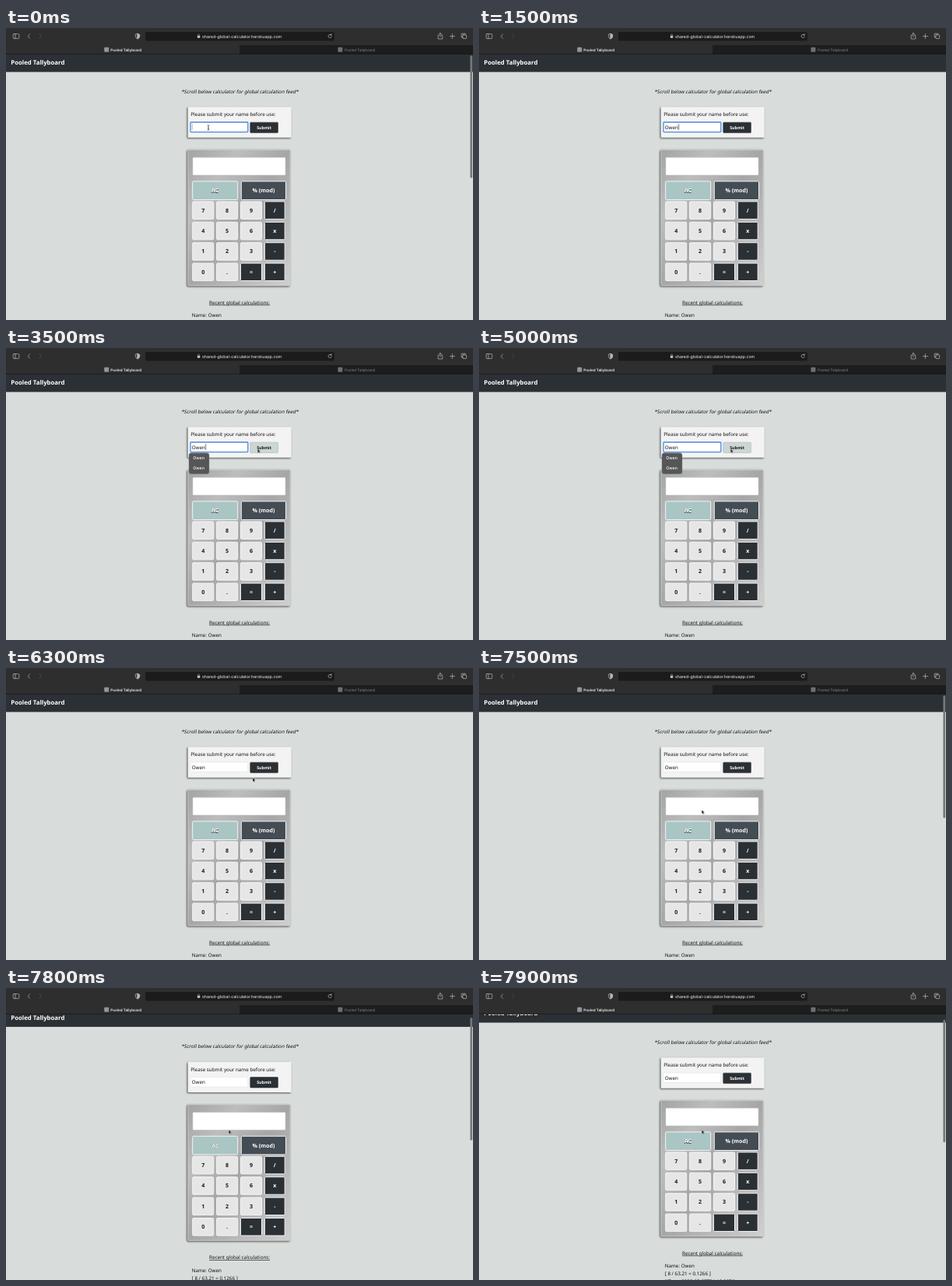
Recreate the animation shown at these times as an HTML page. Size 600x375 px, loop 8000 ms.

```html
<!DOCTYPE html>
<html lang="en">
<head>
<meta charset="utf-8">
<title>Pooled Tallyboard</title>
<style>
  html, body { margin: 0; width: 100%; height: 100%; overflow: hidden; background: #d8dddc; }
  svg { display: block; width: 100vw; height: 100vh; }
  text { font: 6.27px "Noto Sans", "Open Sans", sans-serif; fill: #111; text-rendering: geometricPrecision; }
  .mid { text-anchor: middle; }
  .bold { font-weight: 700; }
  .title { font-size: 7.8px; fill: #fff; }
  .chrome text, .popup text { font-family: Inter, Roboto, sans-serif; fill: #f2f2f2; }
  .chrome .address { font-size: 5.3px; }
  .chrome .tab { font-size: 4.6px; font-weight: 600; }
  .chrome .idle { font-weight: 400; fill: #8b8b8b; }
  .popup text { font-size: 5.3px; font-weight: 500; fill: #fff; }
  .icon { fill: none; stroke: #b9b9b9; stroke-width: .7; stroke-linecap: round; stroke-linejoin: round; }
  .dim { stroke: #555; }
  .card { filter: drop-shadow(-.8px 1.3px 1.2px rgba(0, 0, 0, .65)); }
  .key { font-size: 7.1px; font-weight: 700; }

  /* One percent is 80 ms; each 100 ms tick is 1.25%. */
  .page, .thumb, .ring, .typed, .caret, .popup, .button, .label, .beam, .arrow {
    animation: 8s step-end infinite;
  }
  .page { animation-name: page; }
  .thumb { animation-name: thumb; }
  .ring { animation-name: ring; }
  .typed { animation-name: typed; }
  .caret { animation-name: caret; }
  .popup { animation-name: popup; }
  .button { animation-name: button; }
  .label { animation-name: label; font-size: 5.3px; font-weight: 800; }
  .beam { animation-name: beam; }
  .arrow { animation-name: arrow; }

  @keyframes page {
    0% { transform: translateY(0); }
    96.25% { transform: translateY(-2px); }
    97.5% { transform: translateY(-6.6px); }
    98.75%, 100% { transform: translateY(-12px); }
  }
  @keyframes thumb {
    0% { opacity: 1; transform: translateY(0); }
    3.75% { opacity: .66; }
    5% { opacity: .33; }
    6.25% { opacity: 0; }
    93.75% { opacity: 1; transform: translateY(0); }
    96.25% { opacity: 1; transform: translateY(.9px); }
    97.5% { opacity: 1; transform: translateY(3px); }
    98.75%, 100% { opacity: 1; transform: translateY(5.5px); }
  }
  @keyframes ring {
    0% { stroke: #4f88df; stroke-width: 1.3px; }
    72.5%, 100% { stroke: #dcdcdc; stroke-width: .5px; }
  }
  @keyframes typed {
    0% { transform: translateX(0); }
    15% { transform: translateX(4.9px); }
    16.25% { transform: translateX(9.8px); }
    17.5% { transform: translateX(13.4px); }
    18.75%, 100% { transform: translateX(17.3px); }
  }
  @keyframes caret {
    0% { opacity: .5; }
    3.75% { opacity: .65; }
    5% { opacity: .8; }
    6.25% { opacity: 1; }
    25%, 37.5%, 50%, 62.5% { opacity: 0; }
    28.75%, 41.25%, 53.75%, 66.25% { opacity: .33; }
    30%, 42.5%, 55%, 67.5% { opacity: .67; }
    31.25%, 43.75%, 56.25%, 68.75% { opacity: 1; }
    72.5%, 100% { opacity: 0; }
  }
  @keyframes popup {
    0%, 72.5%, 100% { opacity: 0; }
    25% { opacity: 1; }
  }
  @keyframes button {
    0%, 78.75%, 100% { fill: #2b3035; stroke: #2b3035; }
    40% { fill: #ccd6d4; stroke: #aeb6b4; }
  }
  @keyframes label {
    0%, 78.75%, 100% { fill: #fff; }
    40% { fill: #16191b; }
  }
  @keyframes beam {
    0% { opacity: 1; transform: translate(260px, 128px); }
    10% { opacity: 1; transform: translate(283px, 127.5px); }
    11.25% { opacity: 1; transform: translate(301px, 127px); }
    15% { opacity: 1; transform: translate(306px, 127px); }
    16.25% { opacity: 0; transform: translate(306px, 127px); }
    25% { opacity: 1; transform: translate(301px, 127px); }
    27.5% { opacity: 1; transform: translate(303px, 127.5px); }
    31.25% { opacity: 1; transform: translate(302px, 126.5px); }
    33.75% { opacity: 1; transform: translate(301.3px, 126.2px); }
    38.75% { opacity: 1; transform: translate(307px, 127px); }
    40%, 100% { opacity: 0; transform: translate(307px, 127px); }
  }
  @keyframes arrow {
    0% { opacity: 0; transform: translate(314px, 127.5px); }
    40% { opacity: 1; transform: translate(314px, 127.5px); }
    41.25% { opacity: 1; transform: translate(319px, 128.5px); }
    42.5% { opacity: 1; transform: translate(322px, 129.2px); }
    43.75% { opacity: 1; transform: translate(323.3px, 129.5px); }
    77.5% { opacity: 1; transform: translate(322px, 132px); }
    78.75% { opacity: 1; transform: translate(317px, 141px); }
    80% { opacity: 1; transform: translate(309px, 155px); }
    81.25% { opacity: 1; transform: translate(300px, 168px); }
    82.5% { opacity: 1; transform: translate(293px, 176px); }
    83.75% { opacity: 1; transform: translate(288px, 181px); }
    85%, 100% { opacity: 1; transform: translate(286.2px, 182.3px); }
  }
</style>
</head>
<body>
<svg viewBox="0 0 600 375" preserveAspectRatio="none">
  <defs>
    <linearGradient id="metal" x1="0" y1="0" x2="1" y2="1">
      <stop offset="0" stop-color="#a3a3a3"/>
      <stop offset=".25" stop-color="#bdbdbd"/>
      <stop offset=".5" stop-color="#a6a6a6"/>
      <stop offset="1" stop-color="#cfcfcf"/>
    </linearGradient>
  </defs>

  <rect width="600" height="375" fill="#d8dddc"/>

  <g class="page">
    <rect y="20" width="600" height="36.5" fill="#2b3035"/>
    <text class="bold title" x="6.3" y="47.2">Pooled Tallyboard</text>
    <text class="mid" transform="translate(300.4 84) skewX(-12)">*Scroll below calculator for global calculation feed*</text>

    <rect class="card" x="233.7" y="101.3" width="133" height="39.4" rx="1" fill="#f3f3f3"/>
    <text x="237.2" y="113.4">Please submit your name before use:</text>
    <rect class="ring" x="237" y="121" width="73.8" height="12.6" rx=".8" fill="#fff"/>
    <text x="238.7" y="129.5">Owen</text>
    <g class="typed">
      <rect x="238.8" y="122.5" width="19" height="9.6" fill="#fff"/>
      <rect class="caret" x="238.8" y="123.2" width=".7" height="7.6" fill="#222"/>
    </g>
    <rect class="button" x="313.8" y="121.2" width="35.6" height="13.4" rx=".8" stroke-width=".6"/>
    <text class="mid label" x="331.6" y="129.9">Submit</text>

    <rect class="card" x="233.8" y="156.3" width="131.4" height="174.6" rx="1" fill="url(#metal)" stroke="#d2d2d2" stroke-width=".9"/>
    <rect x="240" y="166.3" width="119" height="22.6" rx="1" fill="#fff" stroke="#c9c9c9" stroke-width=".5"/>
    <g id="keys"></g>

    <text class="mid" x="300" y="354.6" text-decoration="underline">Recent global calculations:</text>
    <text x="238.7" y="371.4">Name: Owen</text>
    <text x="238.7" y="381.2">[ 8 / 63.21 = 0.1266 ]</text>
    <text x="238.7" y="390.6">[ Time: 2022-05-27T21:10:00Z ]</text>
  </g>

  <g class="popup">
    <rect x="235" y="134.8" width="26" height="27" rx="3" fill="#555657" stroke="#77797a" stroke-width=".4"/>
    <text x="240.2" y="143.4">Owen</text>
    <text x="240.2" y="156.3">Owen</text>
  </g>

  <rect class="thumb" x="596.4" y="35.2" width="2.8" height="157.5" rx="1.4" fill="#747877"/>

  <g class="chrome">
    <rect width="600" height="33.6" fill="#2e2e2e"/>
    <rect x="300" y="22" width="300" height="11.6" fill="#1d1d1d"/>
    <path d="M0 33.4H600" stroke="#111" stroke-width=".5"/>
    <rect x="179" y="5" width="243" height="11.6" rx="2.6" fill="#1b1b1b"/>
    <g class="icon">
      <rect x="9.2" y="7.6" width="7.6" height="6" rx="1"/>
      <path d="M12 7.6v6M30.5 8l-2.3 2.6 2.3 2.6"/>
      <path class="dim" d="M43 8l2.3 2.6L43 13.2"/>
      <path d="M169 7.4l2.6 1v2.4q0 2-2.6 3.2q-2.6-1.2-2.6-3.2v-2.4z"/>
      <path d="M169 7.4l2.6 1v2.4q0 2-2.6 3.2z" fill="#b9b9b9"/>
      <path d="M418 9a2.2 2.2 0 1 0 .4 2M418.2 7.6v1.6h-1.6"/>
      <path d="M556.6 9.2h-1.4v4.8h5.6V9.2h-1.4M558 11.2V6.4m-1.4 1.4l1.4-1.4 1.4 1.4"/>
      <path d="M573.4 7.6v6M570.4 10.6h6"/>
      <path d="M586.8 12h-1.6V7.2h4.8v1.6"/>
      <rect x="586.8" y="8.8" width="4.8" height="4.8" rx=".8"/>
      <path d="M246.6 10v-.9a1 1 0 0 1 2 0v.9" stroke-width=".6"/>
    </g>
    <rect x="245.9" y="10" width="3.4" height="2.8" rx=".5" fill="#c4c4c4"/>
    <text class="address" x="252" y="12.6">shared-global-calculator.herokuapp.com</text>
    <rect x="126.2" y="24.8" width="6" height="6" rx="1" fill="#8d979e"/>
    <text class="tab" x="134.3" y="29.6">Pooled Tallyboard</text>
    <rect x="426.4" y="24.8" width="6" height="6" rx="1" fill="#6a7176"/>
    <text class="tab idle" x="435" y="29.6">Pooled Tallyboard</text>
  </g>

  <path class="beam" d="M-1.4-3.2Q0-3.2 0-2.4Q0-3.2 1.4-3.2M0-2.4V2.4M-1.4 3.2Q0 3.2 0 2.4Q0 3.2 1.4 3.2M-.7.7H.7" fill="none" stroke="#222" stroke-width=".7"/>
  <path class="arrow" d="M0 0V5L1.2 3.9 2 5.8 2.9 5.4 2.1 3.6H3.7Z" fill="#000" stroke="#fff" stroke-width=".35"/>
</svg>
<script>
  const keys = document.getElementById("keys");
  const DARK = "#2b3035", LIGHT = "#e6e6e6";

  function add(tag, attrs, text = "") {
    const node = document.createElementNS(keys.namespaceURI, tag);
    for (const name in attrs) node.setAttribute(name, attrs[name]);
    node.textContent = text;
    keys.append(node);
    return node;
  }

  function addKey(label, x, y, width, height, fill) {
    add("rect", { x, y, width, height, fill, rx: 1.2, stroke: "#f4f4f4", "stroke-width": 1 });
    const text = add("text", { class: "mid key", x: x + width / 2, y: y + height / 2 + 2.5 }, label);
    text.style.fill = fill === LIGHT ? "#1b1b1b" : "#fff";
    return text;
  }

  addKey("AC", 239.7, 196.9, 58, 23.6, "#a9c5c4").style.textShadow = "-.4px .4px .6px #333";
  addKey("% (mod)", 302.3, 196.9, 57.2, 23.6, "#444c54");

  ["789/", "456x", "123-", "0.=+"].forEach((row, r) => {
    [...row].forEach((label, c) => {
      const fill = /[\d.]/.test(label) ? LIGHT : DARK;
      addKey(label, 239.7 + 30.9 * c, 222.9 + 26.4 * r, c === 3 ? 25.8 : 27, 22.5, fill);
    });
  });
</script>
</body>
</html>
```
